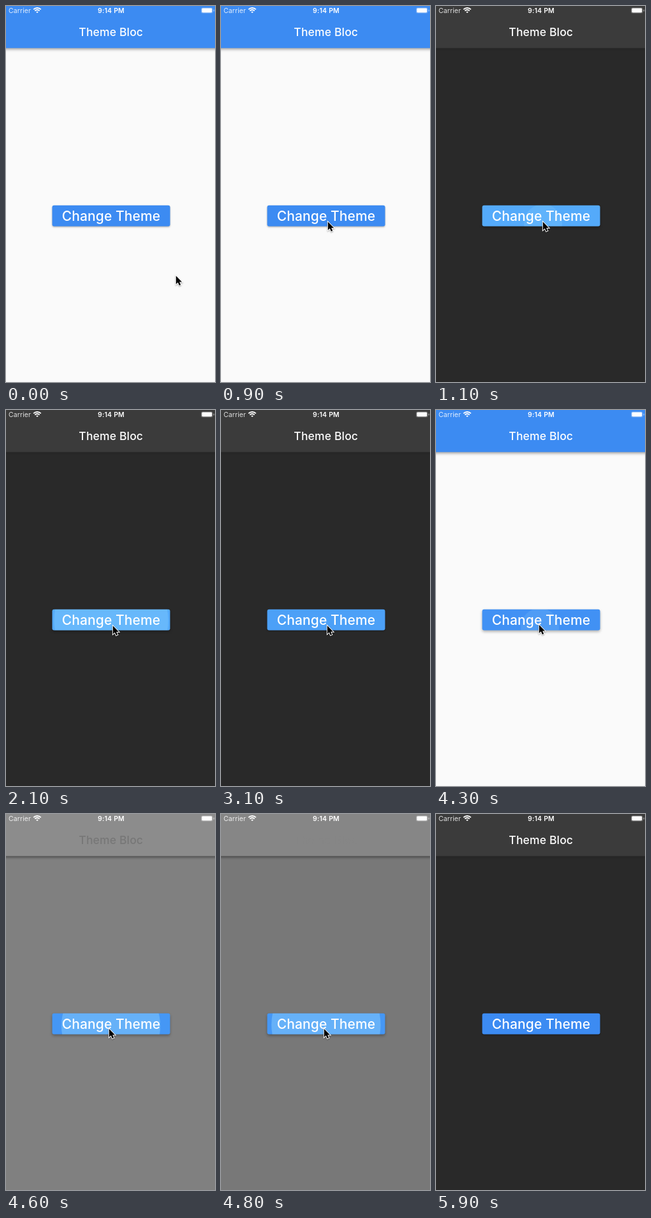
An HTML page with a canvas that plays this animation: 328 px wide and 588 px high, repeating every 6600 ms.

```html
<!DOCTYPE html>
<html lang="en">
<head>
<meta charset="utf-8">
<title>Theme Bloc</title>
<style>
  html, body { margin: 0; width: 100%; height: 100%; overflow: hidden; background: #fafafa; }
  canvas { display: block; }
</style>
</head>
<body>
<canvas id="stage" width="328" height="588"></canvas>
<script>
const ctx = document.getElementById('stage').getContext('2d');
const LOOP = 6600, STEP = 100, SPLASH = 1400;
const FONT = 'Inter, Roboto, sans-serif';
const BUTTON = [72.5, 311.7, 185, 32.8, 3];

// the theme runs through these stops from light to dark
const stops = [
  { bar: [60, 139, 242], page: 250, title: 255, shade: .35 },
  { bar: [140, 140, 140], page: 128, title: 119, shade: .4 },
  { bar: [134, 134, 134], page: 120, title: 134, shade: .4 },
  { bar: [59, 59, 59], page: 41, title: 255, shade: .1 }
];

const presses = [
  { from: 900, splash: 1100, to: 3700, glow: .8, x: 168 },
  { from: 3700, splash: 3700, to: 4200, glow: .3, x: 162 },
  { from: 4200, splash: 4300, to: 5900, glow: .3, x: 163 }
];

const mix = (a, b, p) => a + (b - a) * p;
const ramp = (t, a, b) => Math.min(1, Math.max(0, (t - a) / (b - a)));
const smooth = p => p * p * (3 - 2 * p);
const rgb = (r, g = r, b = r) => `rgb(${Math.round(r)},${Math.round(g)},${Math.round(b)})`;

function themeAt(t) {
  const dark = ramp(t, 900, 1100) - ramp(t, 3700, 4200) + ramp(t, 4400, 5000);
  const pos = dark * 3, i = Math.min(2, Math.floor(pos)), p = pos - i;
  const a = stops[i], b = stops[i + 1];
  return {
    bar: rgb(...a.bar.map((v, n) => mix(v, b.bar[n], p))),
    page: rgb(mix(a.page, b.page, p)),
    title: rgb(mix(a.title, b.title, p)),
    shade: mix(a.shade, b.shade, p)
  };
}

function withShadow(alpha, blur, dy, draw) {
  ctx.save();
  ctx.shadowColor = `rgba(0,0,0,${alpha})`;
  ctx.shadowBlur = blur;
  ctx.shadowOffsetY = dy;
  draw();
  ctx.restore();
}

function box(x, y, w, h, r, color) {
  ctx.fillStyle = color;
  ctx.beginPath();
  ctx.roundRect(x, y, w, h, r);
  ctx.fill();
}

function label(text, x, y, size, weight, color, align = 'center', spacing = .1) {
  ctx.font = `${weight} ${size}px ${FONT}`;
  ctx.letterSpacing = spacing + 'px';
  ctx.textAlign = align;
  ctx.fillStyle = color;
  ctx.fillText(text, x, y);
}

function statusBar() {
  label('Carrier', 4, 11, 10.5, 400, 'rgba(255,255,255,.85)', 'left');
  label('9:14 PM', 165, 11, 10.5, 600, '#fff', 'center', .2);
  ctx.strokeStyle = ctx.fillStyle = '#fff';
  ctx.lineWidth = 1.8;
  for (const r of [8.2, 5.2, 1.6]) {
    ctx.beginPath();
    ctx.arc(49, 11.2, r, -Math.PI * .75, -Math.PI * .25);
    ctx.stroke();
  }
  box(306, 2.4, 18.6, 9, 2.5, 'rgba(255,255,255,.25)');
  box(307.4, 3.6, 15.8, 6.6, 1.4, '#fff');
  box(325.6, 5.5, 1.2, 3, .6, 'rgba(255,255,255,.5)');
}

function button(t) {
  const press = presses.find(p => t >= p.from && t < p.to);
  const age = press ? t - press.splash : -1;
  const splashing = age >= 0 && age < SPLASH;
  const glow = press ? press.glow * Math.min(ramp(t, press.from, press.from + 200), ramp(t, press.to, press.to - 900)) : 0;
  const face = rgb(60 + 30 * glow, 139 + 39 * glow, 242 + 10 * glow);
  const lift = splashing ? 1 : 0;
  withShadow(.3, 2.5 + 2 * lift, 1.2 + lift, () => box(...BUTTON, face));
  if (splashing) {
    const grown = 1 - Math.exp(-age / 190);
    const alpha = .25 * Math.min(1, .4 + age / 400, (SPLASH - age) / 600);
    ctx.save();
    ctx.beginPath();
    ctx.roundRect(...BUTTON);
    ctx.clip();
    ctx.fillStyle = `rgba(200,255,255,${alpha})`;
    ctx.beginPath();
    ctx.arc(mix(press.x, 165, grown), mix(340, 329, grown), 30 + 60 * grown, 0, 7);
    ctx.fill();
    ctx.restore();
  }
  label('Change Theme', 165, 336, 21, 500, '#fff');
}

function pointer(t) {
  const come = smooth(ramp(t, 0, 600)), nudge = ramp(t, 3000, 3600), leave = smooth(ramp(t, 5000, 5600));
  ctx.save();
  ctx.translate(266.8 - 99 * come - 6 * nudge + 120 * leave, 422 - 84.5 * come - 1.5 * nudge + leave);
  ctx.scale(.86, .86);
  ctx.beginPath();
  [[0, 0], [0, 15.2], [3.5, 12], [5.9, 17.5], [8.6, 16.3], [6.2, 11], [10.8, 11]]
    .forEach(p => ctx.lineTo(...p));
  ctx.closePath();
  ctx.lineWidth = 2.2;
  ctx.strokeStyle = '#fff';
  withShadow(.35, 2, 1, () => ctx.stroke());
  ctx.fillStyle = '#000';
  ctx.fill();
  ctx.restore();
}

function draw(t) {
  const { bar, page, title, shade } = themeAt(t);
  ctx.fillStyle = page;
  ctx.fillRect(0, 0, 328, 588);
  withShadow(shade, 4, 1.8, () => box(-10, -10, 348, 75.8, 0, bar));
  statusBar();
  label('Theme Bloc', 164.7, 47, 17.5, 500, title, 'center', .15);
  button(t);
  if (t < 5700) pointer(t);
}

const start = performance.now();
function tick() {
  const t = (performance.now() - start) % LOOP;
  draw(Math.floor(t / STEP) * STEP);
  requestAnimationFrame(tick);
}
tick();
</script>
</body>
</html>
```
